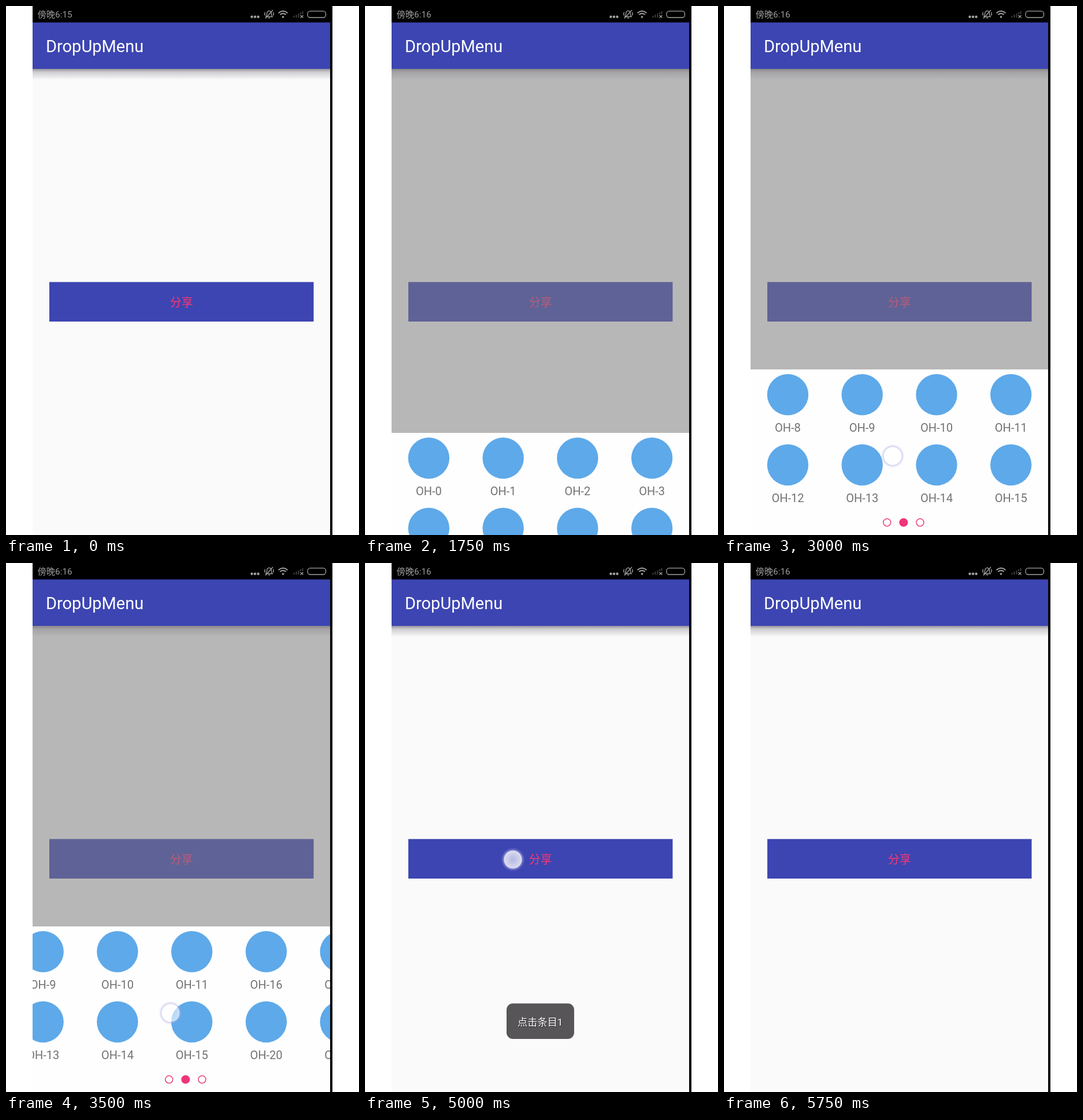
Recreate the animation shown at these times as an HTML page. Size 611x917 px, loop 6000 ms.

```html
<!DOCTYPE html>
<html lang="zh-CN">
<head>
<meta charset="utf-8">
<title>DropUpMenu</title>
<style>
html, body { margin: 0; width: 100%; height: 100%; overflow: hidden; background: #fff; }
svg { display: block; width: 611px; height: 917px; }
text { font-family: Roboto, "Noto Sans CJK SC", "Noto Sans CJK", sans-serif; }
.mid { text-anchor: middle; }
.label { font-size: 20px; fill: #727172; text-anchor: middle; }
.dot { fill: #fff; stroke: #e8407c; stroke-width: 1.5; }

#early, #late, #dim, #panel, #pages, #mark, #toast, #touch {
  animation: 6s step-end infinite;
}
#early { animation-name: early; }
#late { animation-name: late; }
#dim { animation-name: dim; }
#panel { animation-name: panel; }
#pages { animation-name: pages; }
#mark { animation-name: mark; }
#toast { animation-name: toast; }
#touch { animation-name: touch; }

@keyframes early { 0% { opacity: 1 } 29.166%, 100% { opacity: 0 } }
@keyframes late { 0% { opacity: 0 } 29.166%, 100% { opacity: 1 } }
@keyframes dim {
  0% { opacity: 0 }
  29.166% { opacity: 1 }
  70.833% { opacity: .5 }
  75% { opacity: 0 }
  87.5% { opacity: 1 }
  91.666%, 100% { opacity: 0 }
}
@keyframes panel {
  0% { transform: translateY(290px) }
  29.166% { transform: translateY(110px) }
  33.333% { transform: none }
  70.833% { transform: translateY(150px) }
  75% { transform: translateY(290px) }
  87.5% { transform: none }
  91.666%, 100% { transform: translateY(290px) }
}
@keyframes pages {
  0% { transform: none }
  45.833% { transform: translateX(-215px) }
  50% { transform: translateX(-515px) }
  58.333% { transform: translateX(-690px) }
  62.5%, 100% { transform: translateX(-515px) }
}
@keyframes mark {
  0% { transform: none }
  50%, 100% { transform: translateX(28.6px) }
}
@keyframes toast {
  0% { opacity: 0 }
  79.166% { opacity: 1 }
  91.666%, 100% { opacity: 0 }
}
@keyframes touch {
  0% { opacity: 0 }
  25% { opacity: 1; transform: translate(269px, 540px) }
  29.166% { opacity: 0 }
  45.833% { opacity: 1; transform: translate(345px, 778px) }
  50% { opacity: .8; transform: translate(292px, 780px) }
  54.166% { opacity: 0 }
  58.333% { opacity: .8; transform: translate(285px, 780px) }
  62.5% { opacity: 0 }
  66.666% { opacity: .45; transform: translate(226px, 694px) }
  70.833% { opacity: 0 }
  83.333% { opacity: 1; transform: translate(256px, 514px) }
  87.5%, 100% { opacity: 0 }
}
</style>
</head>
<body>
<svg viewBox="0 0 611 917">
  <defs>
    <linearGradient id="shade" x2="0" y2="1">
      <stop offset="0" stop-color="#46414f" stop-opacity=".55"/>
      <stop offset=".3" stop-color="#46414f" stop-opacity=".24"/>
      <stop offset="1" stop-color="#46414f" stop-opacity="0"/>
    </linearGradient>
    <radialGradient id="glow">
      <stop offset="0" stop-color="#fff" stop-opacity=".62"/>
      <stop offset=".5" stop-color="#fff" stop-opacity=".75"/>
      <stop offset=".73" stop-color="#fff" stop-opacity=".82"/>
      <stop offset=".79" stop-color="#a9a8e2" stop-opacity=".6"/>
      <stop offset=".86" stop-color="#a9a8e2" stop-opacity=".35"/>
      <stop offset="1" stop-color="#a9a8e2" stop-opacity="0"/>
    </radialGradient>
    <clipPath id="screen"><path d="M46 0H561V917H46Z"/></clipPath>
  </defs>

  <rect x="46" width="515" height="917" fill="#fafafa"/>
  <rect x="75" y="478.5" width="457.5" height="68.5" fill="#3c45b1"/>
  <text class="mid" x="303.7" y="521" font-size="20" fill="#ff3672">分享</text>
  <rect x="46" y="109" width="515" height="19" fill="url(#shade)"/>
  <rect id="dim" x="46" y="109" width="515" height="808" fill="#7f7e7f" fill-opacity=".53"/>

  <g clip-path="url(#screen)">
    <g id="panel">
      <rect x="46" y="630" width="515" height="300" fill="#fefefe"/>
      <g id="pages"></g>
      <g class="dot">
        <circle cx="282.2" cy="895.3" r="6.5"/>
        <circle cx="310.8" cy="895.3" r="6.5"/>
        <circle cx="339.4" cy="895.3" r="6.5"/>
      </g>
      <circle id="mark" cx="282.2" cy="895.3" r="7.3" fill="#f0357a"/>
    </g>
  </g>

  <rect x="46" y="28" width="515" height="81" fill="#3c45b1"/>
  <text x="69" y="80" font-size="29" fill="#fff">DropUpMenu</text>

  <path d="M46 0H565V917H561V28.5H46Z"/>
  <g font-size="15.3" fill="#9c9c9c">
    <text id="early" x="54.5" y="20">傍晚6:15</text>
    <text id="late" x="54.5" y="20">傍晚6:16</text>
  </g>
  <g fill="#a2a2a2">
    <circle cx="425.5" cy="18.7" r="2.2"/>
    <circle cx="431" cy="18.7" r="2.2"/>
    <circle cx="436.5" cy="18.7" r="2.2"/>
    <circle cx="479.5" cy="19" r="1.8"/>
    <path d="M453.5 20h4l-2 2z"/>
  </g>
  <g fill="none" stroke="#a2a2a2" stroke-width="1.3">
    <path d="M450 18.5c2-2 1-5 2-7.500q1.200-2.700 3.500-2.700t3.500 2.700c1 2.500 0 5.500 2 7.500zM449 21.500L462 7M448.500 10.500q-1.500 3 0 6M462.500 10.500q1.500 3 0 6"/>
    <path d="M471.500 12.200q8-6.800 16 0M474.300 15q5.200-4.200 10.400 0" stroke-width="1.900"/>
    <rect x="522" y="8.800" width="31.500" height="11.200" rx="4.500"/>
    <path d="M509.500 16l5 4.500m0-4.500l-5 4.500"/>
  </g>
  <path d="M498.500 20v-3M502.500 20v-5M506.500 20v-7M510 14v-3M513.500 14v-5" stroke="#3f3f3f" stroke-width="2"/>

  <g id="toast">
    <rect x="245" y="763.500" width="117" height="61.500" rx="11" fill="#575557"/>
    <text class="mid" x="304" y="802.500" font-size="17.200" fill="#222">点击条目1</text>
    <text class="mid" x="303.300" y="801.500" font-size="17.200" fill="#fff">点击条目1</text>
  </g>
  <circle id="touch" r="20.500" fill="url(#glow)"/>
</svg>
<script>
const pages = document.getElementById("pages");

function add(tag, attrs, text = "") {
  const node = document.createElementNS("http://www.w3.org/2000/svg", tag);
  for (const key in attrs) node.setAttribute(key, attrs[key]);
  node.textContent = text;
  pages.append(node);
}

// Three pages side by side, each with two rows of four
for (let i = 0; i < 24; i++) {
  const x = 110.4 + (i % 4) * 128.75 + Math.floor(i / 8) * 515;
  const y = 673.7 + (Math.floor(i / 4) % 2) * 121.8;
  add("circle", { cx: x, cy: y, r: 35.7, fill: "#5ea9e9" });
  add("text", { x, y: y + 64.3, class: "label" }, "OH-" + i);
}
</script>
</body>
</html>
```
